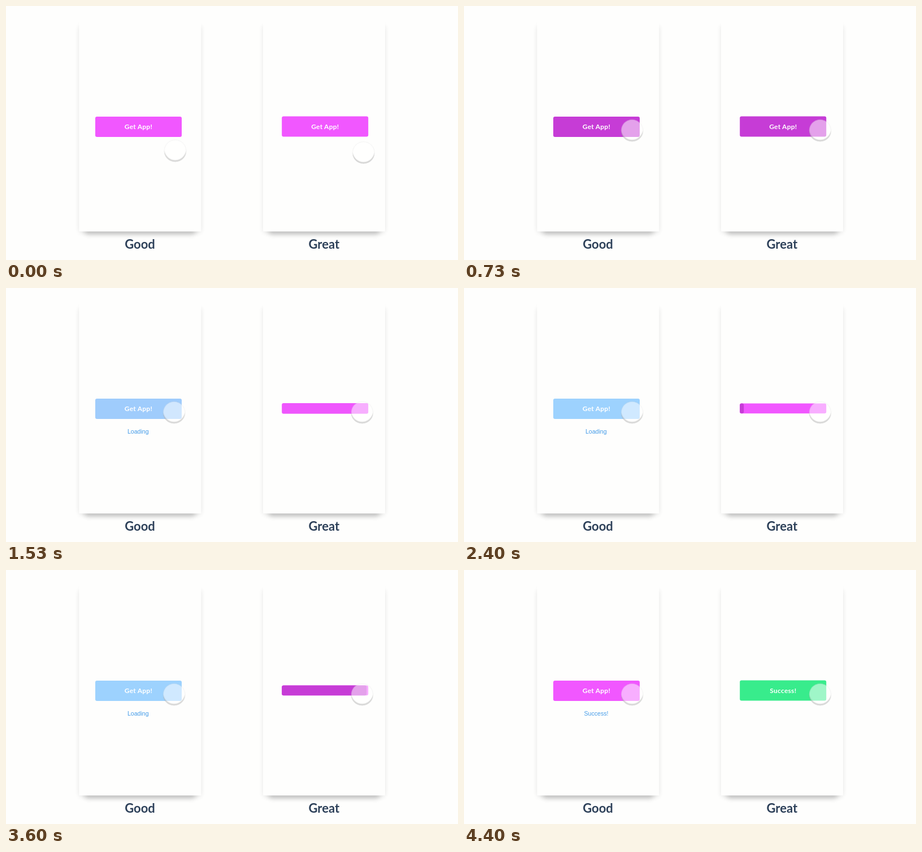
An HTML page that plays this animation: 800x450 px, repeating every 5.13 s.

```html
<!DOCTYPE html>
<html lang="en">
<head>
<meta charset="utf-8">
<title>Button feedback</title>
<style>
  :root {
    --paper: #fefefd;
    --pink: #f157ff;
    --pressed: #c63cd6;
    --busy: #9dd2fe;
    --done: #38ec8c;
  }
  html, body { margin: 0; width: 100%; height: 100%; overflow: hidden; background: var(--paper); }
  svg { display: block; width: 800px; height: 450px; }

  .card { fill: var(--paper); }
  .glow { fill: #000; opacity: .1; filter: blur(4px); }
  .under { fill: #000; opacity: .19; filter: blur(4px); }
  .title { font: 700 22px Lato, sans-serif; fill: #2d4059; text-anchor: middle; }
  .label { font: 700 12px Lato, sans-serif; letter-spacing: .25px; fill: #fff; text-anchor: middle; }
  .note { font: 10.6px "Liberation Sans", Arial, sans-serif; fill: #459ce8; text-anchor: middle; }
  .disc { fill: rgba(255, 255, 255, .52); stroke: rgba(0, 0, 0, .07); stroke-width: .7; }
  .shade { fill: rgba(0, 0, 0, .18); }

  /* One loop is 5130 ms; 1% is 51.3 ms. */
  .plain, .morph, .fill, .note, .ask, .thanks, .touch {
    animation: 5130ms ease-in-out infinite both;
  }
  .plain { animation-name: plain; }
  .morph { animation-name: morph; }
  .fill { animation-name: fill; fill: var(--pressed); }
  .loading { animation-name: loading; }
  .success { animation-name: success; }
  .ask { animation-name: ask; }
  .thanks { animation-name: thanks; }
  .touch { animation-name: touch; }

  @keyframes touch {
    0%, 1.9% { transform: translate(var(--x0), var(--y0)); }
    11.7%, 100% { transform: translate(var(--x1), 220.5px); }
  }
  @keyframes plain {
    0%, 12% { fill: var(--pink); }
    14.2%, 21.4% { fill: var(--pressed); }
    31.2%, 77% { fill: var(--busy); }
    85.7%, 100% { fill: var(--pink); }
  }
  @keyframes morph {
    0%, 12% { fill: var(--pink); y: 195.5px; height: 36px; }
    14.2%, 23% { fill: var(--pressed); y: 195.5px; height: 36px; }
    31.2%, 74.99% { fill: var(--pink); y: 204.5px; height: 17.7px; }
    75%, 77% { fill: var(--pressed); y: 204.5px; height: 17.7px; }
    85.7%, 100% { fill: var(--done); y: 195.5px; height: 36px; }
  }
  @keyframes fill {
    0%, 46.69% { width: 7px; opacity: 0; }
    46.7% { width: 7px; opacity: 1; animation-timing-function: cubic-bezier(.5, 0, .6, 1); }
    72.7%, 75% { width: 153px; opacity: 1; }
    75.01%, 100% { width: 153px; opacity: 0; }
  }
  @keyframes loading {
    0%, 20.6% { opacity: 0; }
    22.5%, 77.5% { opacity: 1; }
    77.51%, 100% { opacity: 0; }
  }
  @keyframes success {
    0%, 77.5% { opacity: 0; }
    77.51%, 100% { opacity: 1; }
  }
  @keyframes ask {
    0%, 23% { opacity: 1; }
    28%, 100% { opacity: 0; }
  }
  @keyframes thanks {
    0%, 79% { opacity: 0; }
    85.7%, 100% { opacity: 1; }
  }
</style>
</head>
<body>
<svg viewBox="0 0 800 450">
  <defs>
    <g id="phone">
      <rect class="glow" y="34" width="216" height="368" rx="6"/>
      <rect class="under" x="10" y="300" width="196" height="105" rx="6"/>
      <rect class="card" y="22" width="216" height="377.5"/>
    </g>
    <g id="dot">
      <!-- crescent shadows under the disc -->
      <path class="shade" d="M-19.3 0A19.3 19.3 0 0 0 19.3 0A19.6 20.6 0 0 1 -19.3 0Z"/>
      <path class="shade" d="M-19.3 0A19.3 19.3 0 0 0 19.3 0A19.9 21.4 0 0 1 -19.3 0Z"/>
      <circle class="disc" r="19.3"/>
    </g>
  </defs>

  <use href="#phone" x="129.3"/>
  <use href="#phone" x="455"/>
  <text class="title" x="237" y="430">Good</text>
  <text class="title" x="562.8" y="430">Great</text>

  <rect class="plain" x="158" y="196" width="153" height="36" rx="3"/>
  <text class="label" x="234.4" y="218.2">Get App!</text>
  <text class="note loading" x="233.8" y="258">Loading</text>
  <text class="note success" x="234" y="258">Success!</text>

  <rect class="morph" x="488.2" y="195.5" width="153" height="36" rx="3"/>
  <rect class="fill" x="488.2" y="204.5" width="7" height="17.7" rx="3"/>
  <text class="label ask" x="564.8" y="217.7">Get App!</text>
  <text class="label thanks" x="564.8" y="217.7">Success!</text>

  <g class="touch" style="--x0: 299.5px; --y0: 256.5px; --x1: 297.5px"><use href="#dot"/></g>
  <g class="touch" style="--x0: 632.8px; --y0: 259.8px; --x1: 630.3px"><use href="#dot"/></g>
</svg>
</body>
</html>
```
